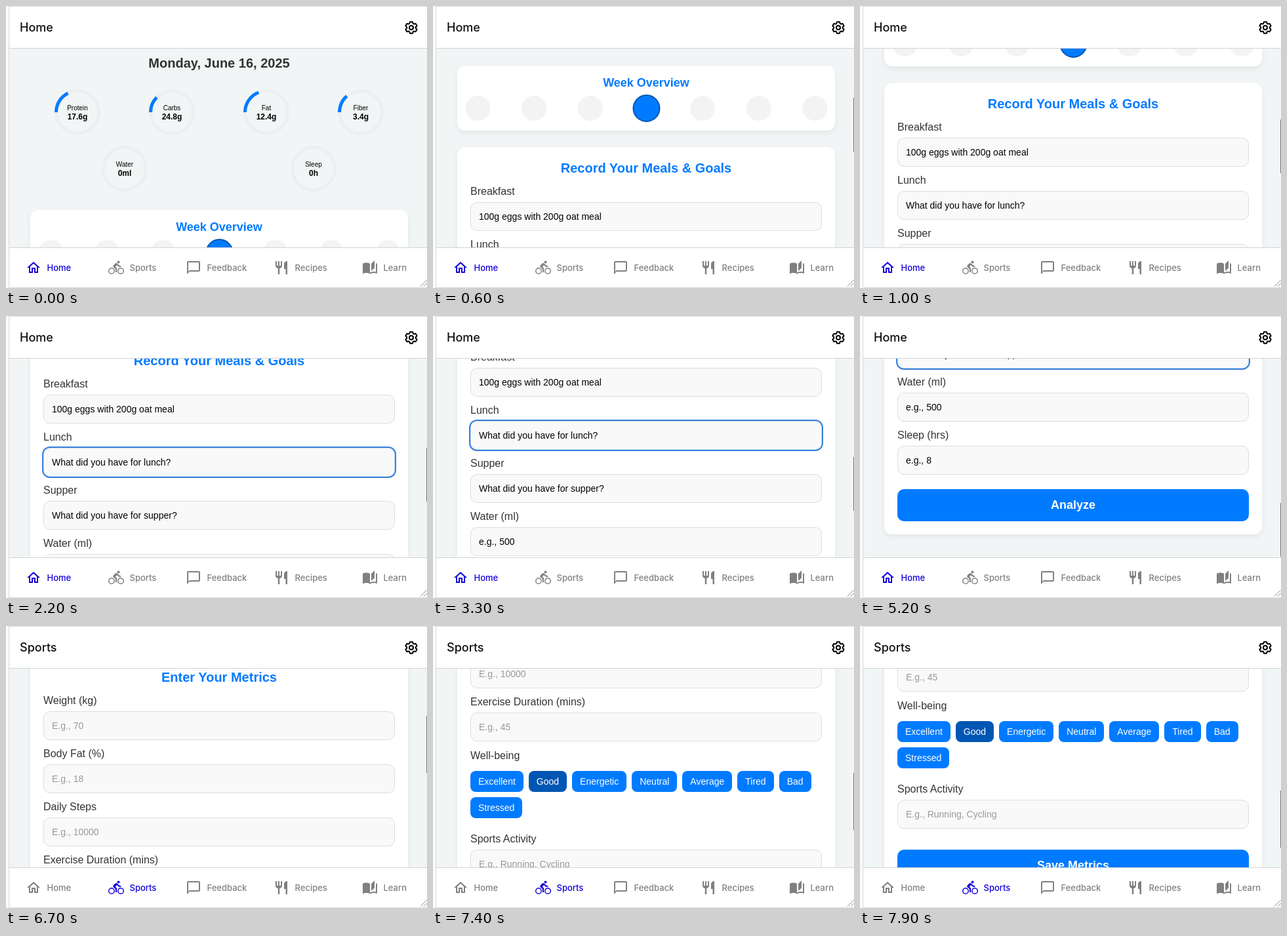
These frames come from a looping animation (642 px wide and 430 px high, 8000 ms). An HTML page:

```html
<!DOCTYPE html>
<html lang="en">
<head>
<meta charset="utf-8">
<title>Health tracker</title>
<style>
  html, body { margin: 0; width: 100%; height: 100%; overflow: hidden; background: #fbfbfb; }
  body { position: relative; font-family: "Liberation Sans", Arial, sans-serif; color: #333; }
  body *, svg { position: absolute; box-sizing: border-box; white-space: nowrap; }
  svg * { position: static; }
  #app { left: 4px; top: 0; width: 640px; height: 430px; border: 1px solid #d9d9d9; background: #fff; }
  #view { left: 5px; top: 65px; width: 637px; height: 303px; overflow: hidden; background: #f1f5f5; }
  .page { left: -5px; top: -65px; width: 642px; height: 1100px; }
  .line { left: 5px; width: 637px; height: 1px; background: #d3d3d3; }
  #bar { left: 641px; width: 1px; background: #757575; }
  .card { left: 37px; width: 576px; background: #fff; border-radius: 12px; box-shadow: 0 4px 10px rgba(0,0,0,.06); }
  .heading { left: 37px; width: 576px; text-align: center; font-weight: bold; line-height: 24px; }
  .label { left: 57px; font-size: 16px; line-height: 18px; }
  .input { left: 57px; width: 536px; height: 44px; padding-left: 12px; border: 1px solid #ddd; border-radius: 10px;
    background: #f9f9f9; font-size: 14px; line-height: 42px; color: #000; }
  .hint { color: #999; }
  .focus { outline: 2px solid #3a80d8; border-color: #c9dcf4; }
  .button { left: 57px; width: 536px; height: 49px; border-radius: 10px; background: #007bff; color: #fff;
    font: bold 18px/49px "Liberation Sans", Arial, sans-serif; text-align: center; }
  .chips { left: 57px; width: 536px; display: flex; flex-wrap: wrap; gap: 8px; }
  .chips b { position: static; padding: 0 12px; border-radius: 8px; background: #007bff; color: #fff;
    font-weight: normal; font-size: 14px; line-height: 32px; }
  .chips .on { background: #0056b3; }
  #title { left: 21px; top: 21px; color: #111; font: 500 18px/24px Inter, sans-serif; }
  .tab { top: 387px; height: 24px; color: #808080; font: 500 13px/25px Inter, sans-serif; }
  .tab svg { left: 0; top: 0; width: 24px; height: 24px; overflow: visible; fill: currentColor; }
  .tab span { left: 32.5px; }
  .tab.on { color: #1400dc; }
</style>
</head>
<body>
<div id="app"></div>
<div id="view"><div class="page" id="home"></div><div class="page" id="sports"></div></div>
<div class="line" style="top:64px"></div>
<div class="line" style="top:368px"></div>
<div id="bar"></div>
<div id="title"></div>
<svg id="gear" style="left:605.5px;top:21px" width="24" height="24" viewBox="-12 -12 24 24" fill="none" stroke="#000" stroke-width="2" stroke-linejoin="round"></svg>
<div id="tabs"></div>
<svg style="left:630px;top:415px" width="12" height="14" stroke="#888"><path d="M2 12.5 12 2.5M7 12.5 12 7.5"/></svg>
<script>
const $ = id => document.getElementById(id);
const div = (cls, top, text = '', style = '') => `<div class="${cls}" style="top:${top}px;${style}">${text}</div>`;
const heading = (y, text, size = 20, color = '#007bff') =>
  div('heading', y - 12, text, `font-size:${size}px;color:${color}`);
const card = (top, bottom) => div('card', top, '', `height:${bottom - top}px`);
const label = (y, text) => div('label', y - 9, text);
const field = (top, name, text, cls = '') => label(top - 16, name) + div('input ' + cls, top, text);
const fields = (top, rows, cls) => rows.map(([name, text], i) => field(top + 81 * i, name, text, cls)).join('');
const circle = (x, y, r, attrs) => `<circle cx="${x}" cy="${y}" r="${r}" ${attrs}/>`;
const layer = body => `<svg width="642" height="430" text-anchor="middle">${body}</svg>`;

function ring(x, y, name = '', value = '', percent = 0) {
  const arc = percent && circle(x, y, 32.5, `fill="none" stroke="#007bff" stroke-width="5" pathLength="100"
    stroke-dasharray="${percent} 100" transform="rotate(180 ${x} ${y})"`);
  return circle(x, y, 32.5, 'fill="none" stroke="#eceeef" stroke-width="5"') + (arc || '') +
    `<text x="${x}" y="${y - 3}" font-size="10">${name}</text>
     <text x="${x}" y="${y + 11}" font-size="12" font-weight="bold">${value}</text>`;
}

const date = heading(87, 'Monday, June 16, 2025', 20, '#333');
const days = [0, 1, 2, 3, 4, 5, 6].map(i => i === 3
  ? circle(325.5, 376, 20, 'fill="#007bff" stroke="#0056b3" stroke-width="2"')
  : circle(68.5 + 85.65 * i, 376, 19, 'fill="#f3f3f3"')).join('');

$('home').innerHTML = date + card(311, 410) + heading(337, 'Week Overview', 18) +
  layer(ring(109, 162, 'Protein', '17.6g', 17.6) + ring(253, 162, 'Carbs', '24.8g', 12.4) +
    ring(397, 162, 'Fat', '12.4g', 19.1) + ring(541, 162, 'Fiber', '3.4g', 13.6) +
    ring(181, 248, 'Water', '0ml') + ring(469, 248, 'Sleep', '0h') + days) +
  card(435, 978) + heading(467, 'Record Your Meals &amp; Goals') +
  fields(519, [
    ['Breakfast', '100g eggs with 200g oat meal'],
    ['Lunch', 'What did you have for lunch?'],
    ['Supper', 'What did you have for supper?'],
    ['Water (ml)', 'e.g., 500'],
    ['Sleep (hrs)', 'e.g., 8']]) +
  div('button', 909, 'Analyze');

const moods = ['Excellent', 'Good', 'Energetic', 'Neutral', 'Average', 'Tired', 'Bad', 'Stressed'];
$('sports').innerHTML = date + layer([109, 253, 397, 541].map(x => ring(x, 162)).join('')) +
  card(246, 927) + heading(278, 'Enter Your Metrics') +
  fields(330, [
    ['Weight (kg)', 'E.g., 70'],
    ['Body Fat (%)', 'E.g., 18'],
    ['Daily Steps', 'E.g., 10000'],
    ['Exercise Duration (mins)', 'E.g., 45']], 'hint') +
  label(638.5, 'Well-being') +
  div('chips', 662, moods.map(m => `<b class="${m === 'Good' ? 'on' : ''}">${m}</b>`).join('')) +
  field(782, 'Sports Activity', 'E.g., Running, Cycling', 'hint') +
  div('button', 858, 'Save Metrics');

const path = d => `<path d="${d}"/>`;
const wheel = x => circle(x, 17, 4.25, 'fill="none" stroke="currentColor" stroke-width="1.5"');
$('tabs').innerHTML = [
  [30, 'Home', path('M12 5.69l5 4.5V18h-2v-6H9v6H7v-7.81l5-4.5M12 3 2 12h3v8h6v-6h2v6h6v-8h3L12 3z')],
  [156, 'Sports', wheel(5) + wheel(19) + circle(15.5, 3.5, 2, '') +
    path('M10.8 10.5l2.4-2.4.8.8c1.3 1.3 3 2.1 5.1 2.1V9c-1.5 0-2.7-.6-3.6-1.5l-1.9-1.9c-.5-.4-1-.6-1.6-.6s-1.1.2-1.4.6L7.8 8.4c-.4.4-.6.9-.6 1.4 0 .6.2 1.1.6 1.4L11 14v5h2v-6.2z')],
  [274, 'Feedback', path('M20 2H4c-1.1 0-2 .9-2 2v18l4-4h14c1.1 0 2-.9 2-2V4c0-1.1-.9-2-2-2zm0 14H6l-2 2V4h16z')],
  [408, 'Recipes', path('M11 9H9V2H7v7H5V2H3v7c0 2.12 1.66 3.84 3.75 3.97V22h2.5v-9.03C11.34 12.84 13 11.12 13 9V2h-2zm5-3v8h2.5v8H21V2c-2.76 0-5 2.24-5 4z')],
  [543, 'Learn', path('M19 1l-5 5v11l5-4.5zM1 6v15.2C3 20.4 5 20 6.5 20c1.95 0 4.05.4 5.5 1.5V6c-1.45-1.1-3.55-1.5-5.5-1.5S2.45 4.9 1 6zm22 15.1V6c-.6-.45-1.25-.75-2-1v13.5c-1.1-.35-2.3-.5-3.5-.5-1.7 0-4.15.65-5.5 1.5v2c1.35-.85 3.8-1.5 5.5-1.5 2 0 3.8.4 5.5 1.1z')],
].map(([x, name, icon]) =>
  `<div class="tab" style="left:${x}px"><svg viewBox="0 0 24 24">${icon}</svg><span>${name}</span></div>`).join('');

const teeth = [0, 1, 2, 3, 4, 5].flatMap(i =>
  [[-24, 6.8], [-13, 9], [13, 9], [24, 6.8]].map(([turn, r]) => {
    const a = (i * 60 + turn) * Math.PI / 180;
    return [r * Math.sin(a), -r * Math.cos(a)].map(v => v.toFixed(2));
  }));
$('gear').innerHTML = `<polygon points="${teeth.join(' ')}"/>` + circle(0, 0, 3, '');

// Scroll offsets as [time, pixels]; one wheel notch is about 133 px.
const homeScroll = [[200, 0], [300, 41], [600, 220], [700, 252], [800, 266], [900, 266], [1000, 318],
  [1100, 374], [1200, 399], [3200, 399], [3300, 440], [3400, 490], [3500, 521], [3600, 532],
  [4200, 532], [4300, 575], [4400, 625], [4500, 645]];
const sportsScroll = [[6400, 0], [6500, 41], [6700, 200], [6800, 250], [6900, 266],
  [7100, 266], [7200, 318], [7400, 441], [7600, 480], [7900, 517]];

function at(keys, t) {
  const next = keys.findIndex(k => k[0] > t);
  if (next === 0) return keys[0][1];
  if (next < 0) return keys[keys.length - 1][1];
  const [t0, v0] = keys[next - 1], [t1, v1] = keys[next];
  return Math.round(v0 + (v1 - v0) * (t - t0) / (t1 - t0));
}

const barFade = [[200, 0], [300, 1], [2800, 1], [3100, 0], [3200, 0], [3300, 1],
  [5500, 1], [5600, 0], [6400, 0], [6500, 1]];
const inputs = $('home').querySelectorAll('.input');
const tabs = $('tabs').querySelectorAll('.tab');

function draw(now) {
  const t = Math.floor(now % 8000 / 100) * 100; // the screen updates ten times a second
  const onHome = t < 5600;
  const page = $(onHome ? 'home' : 'sports');
  const scroll = at(onHome ? homeScroll : sportsScroll, t);
  $('home').hidden = !onHome;
  $('sports').hidden = onHome;
  page.style.transform = `translateY(${-scroll}px)`;
  $('title').textContent = onHome ? 'Home' : 'Sports';
  tabs[0].classList.toggle('on', onHome);
  tabs[1].classList.toggle('on', !onHome);
  inputs[1].classList.toggle('focus', t >= 1800 && t < 4000);
  inputs[2].classList.toggle('focus', t >= 4000);

  const bar = $('bar').style;
  bar.top = 65 + scroll * (onHome ? .341 : .36) + 'px';
  bar.height = (onHome ? 82 : 87) + 'px';
  const fade = keys => {
    const i = keys.findIndex(k => k[0] > t);
    if (i === 0) return keys[0][1];
    if (i < 0) return keys[keys.length - 1][1];
    const [a, u] = keys[i - 1], [b, v] = keys[i];
    return u + (v - u) * (t - a) / (b - a);
  };
  bar.opacity = fade(barFade);
  requestAnimationFrame(draw);
}
requestAnimationFrame(draw);
</script>
</body>
</html>
```
